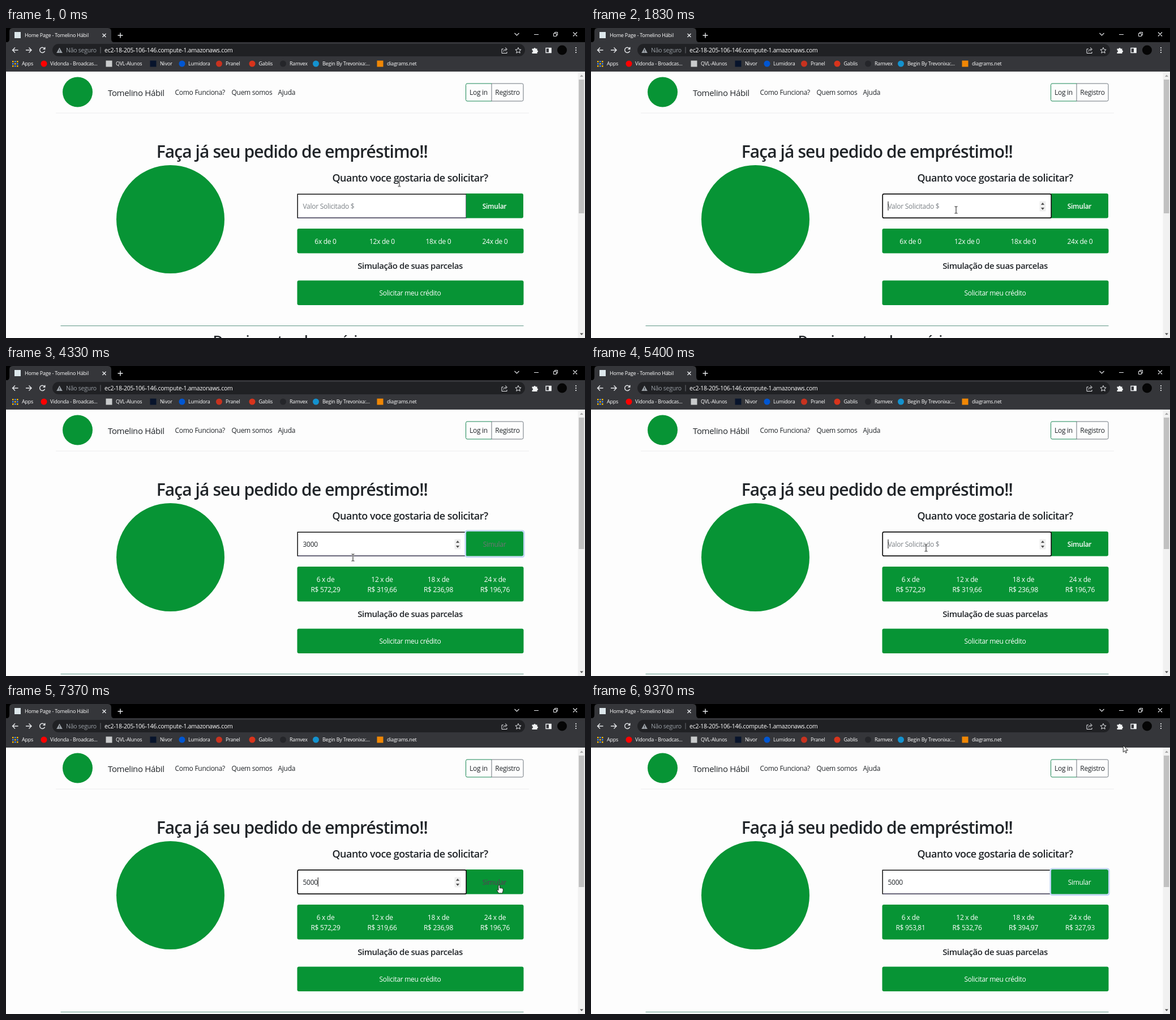
An HTML page for the animation above (9400 ms loop, 1023 by 547 pixels).

```html
<!DOCTYPE html>
<html lang="pt-BR">
<head>
<meta charset="utf-8">
<title>Home Page - Tomelino Hábil</title>
<style>
  html, body { margin: 0; width: 100%; height: 100%; overflow: hidden; background: #fdfdfd; }
  svg { display: block; width: 100vw; height: 100vh; }
  text { font: 12px "Open Sans", "Noto Sans", sans-serif; letter-spacing: -.024em; fill: #212529; }
  .mid text, text.mid { text-anchor: middle; }
  .head text { font-weight: 600; letter-spacing: -.03em; text-anchor: middle; }
  .marks text { font-size: 9px; fill: #fff; }
  .white text { fill: #fff; }
  .line { fill: none; stroke: #e8eaed; stroke-width: 1.4; }
  .green { fill: #079435; }

  .low, .panel, .thumb, .before, .first, .second, .ring, .spin,
  .beam, .arrow, .hand { animation: 9.4s step-end infinite; }
  .low { animation-name: low; }
  .panel { animation-name: panel; }
  .thumb { animation-name: thumb, scroll-hover; }
  .before { animation-name: before; }
  .first { animation-name: first; }
  .second { animation-name: second; }
  .ring { animation-name: ring; }
  .spin { animation-name: spin; }
  .beam { animation-name: beam; }
  .arrow { animation-name: arrow; }
  .hand { animation-name: hand; }
  .simular { fill: #fff; animation: hover 9.4s linear infinite, weight 9.4s step-end infinite; }
  .cursor { animation: move 9.4s ease-in-out infinite; }

  @keyframes low { 0% { transform: none } 43.4%, 100% { transform: translateY(18px) } }
  @keyframes panel { 0% { height: 43.5px } 43.4%, 100% { height: 61.5px } }
  @keyframes thumb { 0% { height: 236px } 43.4%, 100% { height: 232px } }
  @keyframes scroll-hover {
    0% { fill: #c1c1c1 } 33.5% { fill: #a8a8a8 } 37.8% { fill: #c1c1c1 }
    70% { fill: #a8a8a8 } 74.2%, 100% { fill: #c1c1c1 }
  }
  @keyframes before { 0% { opacity: 1 } 43.4%, 100% { opacity: 0 } }
  @keyframes first { 0% { opacity: 0 } 43.4% { opacity: 1 } 80.85%, 100% { opacity: 0 } }
  @keyframes second { 0% { opacity: 0 } 80.85%, 100% { opacity: 1 } }
  @keyframes ring { 0% { opacity: 0 } 43.4% { opacity: 1 } 48.94% { opacity: 0 } 80.85%, 100% { opacity: 1 } }
  @keyframes weight {
    0% { font-weight: 600 } 43.4% { font-weight: 400 }
    48.94% { font-weight: 600 } 80.85%, 100% { font-weight: 400 }
  }
  @keyframes spin { 0% { opacity: 0 } 11.2% { opacity: 1 } 80.85%, 100% { opacity: 0 } }
  @keyframes beam { 0% { opacity: 1 } 31.91% { opacity: 0 } 45.2% { opacity: 1 } 66.7%, 100% { opacity: 0 } }
  @keyframes arrow {
    0% { opacity: 0 } 31.91% { opacity: 1 } 40.43% { opacity: 0 }
    66.7% { opacity: 1 } 77.1% { opacity: 0 } 85.1%, 100% { opacity: 1 }
  }
  @keyframes hand {
    0% { opacity: 0 } 40.43% { opacity: 1 } 45.2% { opacity: 0 }
    77.1% { opacity: 1 } 85.1%, 100% { opacity: 0 }
  }
  @keyframes hover {
    0%, 40.43% { fill: #fff } 42.02%, 45.5% { fill: #212529 } 47.1%, 77.1% { fill: #fff }
    78.7%, 85.1% { fill: #212529 } 86.7%, 100% { fill: #fff }
  }
  @keyframes move {
    0%, 6.38% { transform: translate(695px, 273.5px) }
    11.7% { transform: translate(650px, 318px) }
    19.47%, 30.85% { transform: translate(645px, 321px) }
    34%, 36.2% { transform: translate(1014px, 319px) }
    37.23%, 38.83% { transform: translate(997px, 319px) }
    42.02%, 44.8% { transform: translate(866px, 321px) }
    46.06% { transform: translate(613px, 338px) }
    47.87%, 65.43% { transform: translate(592px, 321px) }
    70.64%, 73.4% { transform: translate(1021.5px, 285px) }
    78.72%, 84.04% { transform: translate(870px, 320px) }
    86.9%, 92.55% { transform: translate(929px, 319px) }
    99.68%, 100% { transform: translate(940px, 73px) }
  }
</style>
</head>
<body>
<svg viewBox="0 0 1023 547" preserveAspectRatio="none">
  <rect width="1023" height="547" fill="#fdfdfd"/>

  <!-- page header -->
  <circle class="green" cx="126.5" cy="113" r="26.5"/>
  <text x="180" y="119.5" style="font-size:15px">Tomelino Hábil</text>
  <text x="298.5" y="118">Como Funciona?</text>
  <text x="398.5" y="118">Quem somos</text>
  <text x="480.5" y="118">Ajuda</text>
  <path d="M858 98H911.5a2.5 2.5 0 0 1 2.5 2.5V126.5a2.5 2.5 0 0 1-2.5 2.5H858Z" fill="none" stroke="#6c757d"/>
  <path d="M858 98H815a2.5 2.5 0 0 0-2.5 2.5V126.5a2.5 2.5 0 0 0 2.5 2.5H858" fill="none" stroke="#198754"/>
  <g class="mid"><text x="835" y="118">Log in</text><text x="886" y="118">Registro</text></g>
  <path d="M88 150H924" stroke="#ececee"/>

  <!-- loan form -->
  <g class="head">
    <text x="505.3" y="228.5" style="font-size:30px">Faça já seu pedido de empréstimo!!</text>
    <text x="714" y="270.5" style="font-size:18px">Quanto voce gostaria de solicitar?</text>
  </g>
  <circle class="green" cx="290.5" cy="337.5" r="95.5"/>

  <g id="idle">
    <rect x="515" y="292.5" width="298" height="43" fill="#fff"/>
    <path d="M813 292.5V335H515" fill="none" stroke="#37344f" stroke-width="1.3"/>
    <path d="M515.2 335.5V293.2H813.5" fill="none" stroke="#111" stroke-width="1.5"/>
  </g>
  <path class="green" d="M813 292H911a3 3 0 0 1 3 3V332.5a3 3 0 0 1-3 3H813Z"/>
  <rect id="focus" x="515.2" y="292.9" width="298" height="42.3" rx="2.5" fill="#fff" stroke="#101010" stroke-width="1.7"/>
  <rect class="ring" x="811.7" y="290.7" width="103.6" height="46.3" rx="3.5" fill="none" stroke="#c2d6f6" stroke-width="2.6"/>
  <text id="hint" x="524.5" y="318.5" style="fill:#7b8085">Valor Solicitado $</text>
  <text id="value" x="524.5" y="318.5"></text>
  <rect id="caret" y="306" width="1" height="16" fill="#111"/>
  <g class="spin">
    <rect x="792.5" y="305.5" width="11" height="18" rx="1" fill="#efefef"/>
    <path d="M795 312l3-4 3 4ZM795 317l3 4 3-4Z" fill="#505050"/>
  </g>
  <text class="mid simular" x="863" y="318.5">Simular</text>

  <rect class="green panel" x="514.5" y="354" width="400" height="43.5" rx="3"/>
  <g id="plans" class="mid white"></g>

  <g class="low">
    <g class="head"><text x="714" y="424.5" style="font-size:15px">Simulação de suas parcelas</text></g>
    <rect class="green" x="514.5" y="445.5" width="400" height="43.5" rx="3"/>
    <g class="mid white"><text x="714" y="472">Solicitar meu crédito</text></g>
    <path d="M96.5 525.5H914.5" stroke="#5f9787" stroke-width="1.2"/>
    <g class="head"><text x="505.5" y="560" style="font-size:24px">Depoimentos de usuários</text></g>
  </g>

  <!-- scrollbar -->
  <rect x="1010.5" y="77" width="12.5" height="470" fill="#f1f1f1"/>
  <rect class="thumb" x="1012" y="91" width="9.5" height="236" fill="#c1c1c1"/>
  <path d="M1014 86l3-3.5 3 3.5Z" fill="#a3a3a3"/>
  <path d="M1014 538.5l3 3.5 3-3.5Z" fill="#505050"/>

  <!-- browser window -->
  <rect width="1023" height="26" fill="#000"/>
  <rect y="25" width="1023" height="52" fill="#35363a"/>
  <rect y="76" width="1023" height="1" fill="#4a4c50"/>
  <path d="M0 25.5Q6 25.5 6 19V6Q6 0 12 0H180Q186 0 186 6V19Q186 25.5 192 25.5Z" fill="#35363a"/>
  <rect x="15" y="7" width="11" height="11" fill="#dce6ea"/>
  <g class="marks"><text x="33" y="16">Home Page - Tomelino Hábil</text></g>
  <g class="line">
    <path d="M170.5 10l6 6m0-6l-6 6M202 8.5v9M197.5 13h9"/>
    <path d="M898.5 9l4 4 4-4M933 11.5h8M1002 7.5l7 7m0-7l-7 7" stroke-width="1.1"/>
    <path d="M967.5 9.5h5v5h-5ZM969.5 9.5v-2h5v5h-2" stroke-width="1"/>
    <path d="M21.5 39h-10m4.5-4.5l-4.5 4.5 4.5 4.5M35 39h10m-4.5-4.5l4.5 4.5-4.5 4.5"/>
    <path d="M68.2 36.5a4.6 4.6 0 1 0 .4 4M68.8 33.8v3.4h-3.4"/>
  </g>
  <rect x="82" y="28" width="835" height="22" rx="11" fill="#202124"/>
  <path d="M94.5 34.5l5.3 9.5h-10.6Z" fill="#9aa0a6"/>
  <path d="M94.5 38v2.7m0 1v1" stroke="#202124"/>
  <text x="106" y="43" style="font-size:10.5px;fill:#9aa0a6">Não seguro</text>
  <path d="M167 33.5v11" stroke="#6b6e73"/>
  <text x="174" y="43" style="font-size:10.5px;fill:#fff">ec2-18-205-106-146.compute-1.amazonaws.com</text>
  <g class="line" style="stroke-width:1">
    <path d="M879 37h-3v7.5h9v-2.5M879 41.5q.5-4 5-4m-2-3l3.5 3-3.5 3"/>
    <path d="M905 34.5l1.5 3.4 3.6.3-2.7 2.4.8 3.6-3.2-1.9-3.2 1.9.8-3.6-2.7-2.4 3.6-.3Z"/>
    <path d="M954 35.5h9v8h-9Z" stroke-width="1.4"/>
  </g>
  <path d="M959 35h4.5v9H959Z" fill="#f1f3f4"/>
  <path d="M929.5 36.5h3a1.6 1.6 0 1 1 3.2 0h2.8v3a1.6 1.6 0 1 1 0 3.2v2.3h-9v-2.5a1.6 1.6 0 1 0 0-3.2Z" fill="#f1f3f4"/>
  <circle cx="982.5" cy="39" r="8.5" fill="#050505"/>
  <path d="M1007 35v.01M1007 39v.01M1007 43v.01" stroke="#f1f3f4" stroke-width="2.2" stroke-linecap="round"/>
  <g id="marks" class="marks"></g>

  <!-- pointer -->
  <g class="cursor">
    <g class="beam" fill="none">
      <path d="M-2.5-6H2.5M-2.5 6H2.5M0-6V6" stroke="#fff" stroke-width="2.4"/>
      <path d="M-2.5-6H-.8L0-5.3.8-6H2.5M-2.5 6H-.8L0 5.3.8 6H2.5M0-5.3V5.3" stroke="#111"/>
    </g>
    <path class="arrow" d="M.3.3V12L3 9.5 4.8 13.5 6.6 12.7 4.9 8.8H8.6Z" fill="#fff" stroke="#111" stroke-width=".9"/>
    <path class="hand" d="M-1 1Q-1-.5.2-.5T1.5 1V5Q4.5 4.3 7.3 6.2V9.5L6 14H-.5L-4 8.5Q-3.5 7-1 9Z" fill="#fff" stroke="#111" stroke-width=".9"/>
  </g>
</svg>
<script>
const NS = 'http://www.w3.org/2000/svg';
const $ = id => document.getElementById(id);

function add(parent, tag, attrs, text = '') {
  const el = document.createElementNS(NS, tag);
  for (const k in attrs) el.setAttribute(k, attrs[k]);
  el.textContent = text;
  parent.append(el);
  return el;
}

// bookmarks: icon centre, icon colour, label start, label, square icon
[
  [67, '#f00', 78, 'Vidonda - Broadcas...'],
  [182, '#c9cbcc', 194, 'QVL-Alunos', true],
  [260, '#08142c', 272, 'Nivor', true],
  [311, '#0056d2', 322, 'Lumidora'],
  [376.5, '#c8321f', 388, 'Pranel'],
  [435, '#d8341c', 446.5, 'Gablis'],
  [489.5, '#25262a', 501, 'Ramvex'],
  [547.5, '#1492cf', 559, 'Begin By Trevonixa:...'],
  [661, '#f08705', 673, 'diagrams.net', true]
].forEach(([cx, fill, x, label, square]) => {
  if (square) add($('marks'), 'rect', { x: cx - 5.5, y: 57.5, width: 11, height: 11, fill });
  else add($('marks'), 'circle', { cx, cy: 63, r: 5.5, fill });
  add($('marks'), 'text', { x, y: 66 }, label);
});
add($('marks'), 'text', { x: 28, y: 66 }, 'Apps');
const dots = ['#ea4335', '#fbbc04', '#34a853', '#4285f4'];
for (let i = 0; i < 9; i++) {
  add($('marks'), 'rect', {
    x: 11 + i % 3 * 4, y: 58 + Math.floor(i / 3) * 4, width: 2.5, height: 2.5, fill: dots[(i * 2 + 1) % 4]
  });
}

// instalment columns
const months = [6, 12, 18, 24];
const columns = [564.5, 664.5, 764, 864];
function plans(name, prices) {
  const g = add($('plans'), 'g', { class: name });
  months.forEach((n, i) => {
    add(g, 'text', { x: columns[i], y: 380.5 }, prices ? `${n} x de` : `${n}x de 0`);
    if (prices) add(g, 'text', { x: columns[i], y: 398.5 }, 'R$ ' + prices[i]);
  });
}
plans('before');
plans('first', ['572,29', '319,66', '236,98', '196,76']);
plans('second', ['953,81', '532,76', '394,97', '327,93']);

// input states: time, value, focused
const steps = [
  [0, '', false], [1400, '', true],
  [2000, '3', true], [2250, '30', true], [2450, '300', true], [2650, '3000', true],
  [4080, '3000', false], [4600, '3000', true],
  [4900, '300', true], [5000, '30', true], [5100, '3', true], [5200, '', true],
  [5500, '5', true], [5750, '50', true], [5950, '500', true], [6200, '5000', true],
  [7600, '5000', false]
];
const show = (id, on) => $(id).setAttribute('visibility', on ? 'visible' : 'hidden');
let start;
function draw(now) {
  start ??= now;
  const t = (now - start) % 9400;
  const [since, value, focused] = steps.findLast(s => s[0] <= t);
  $('value').textContent = value;
  $('caret').setAttribute('x', 524.5 + $('value').getComputedTextLength());
  show('hint', !value);
  show('focus', focused);
  show('idle', !focused);
  show('caret', focused && (t - since) % 1000 < 500);
  requestAnimationFrame(draw);
}
requestAnimationFrame(draw);
</script>
</body>
</html>
```
